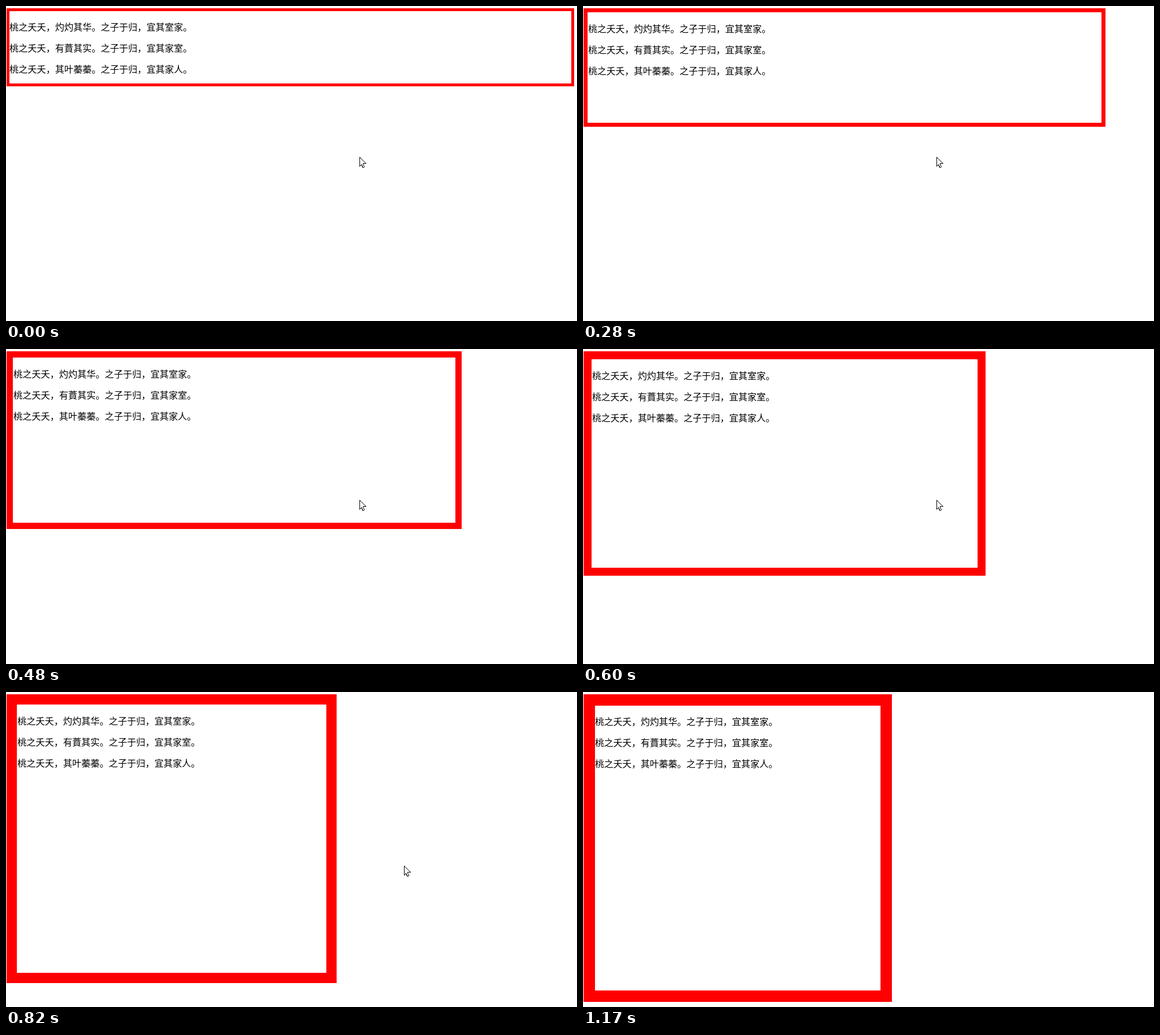
An HTML page that plays this animation: 1000x553 px, repeating every 1.5 s.

```html
<!DOCTYPE html>
<html lang="zh-CN">
<head>
<meta charset="utf-8">
<title>Growing border box</title>
<style>
  html, body { margin: 0; width: 100%; height: 100%; overflow: hidden; background: #fff; }
  svg { display: block; width: 1000px; height: 553px; }
  text { font: 350 16px "Noto Sans CJK SC", "Noto Sans CJK", "Noto Sans CJK JP", sans-serif; fill: #000; }
</style>
</head>
<body>
<svg viewBox="0 0 1000 553">
  <path id="frame" fill="#f00" fill-rule="evenodd" shape-rendering="crispEdges"/>
  <g id="poem">
    <text x="1" y="38">桃之夭夭，灼灼其华。之子于归，宜其室家。</text>
    <text x="1" y="75">桃之夭夭，有蕡其实。之子于归，宜其家室。</text>
    <text x="1" y="112">桃之夭夭，其叶蓁蓁。之子于归，宜其家人。</text>
  </g>
  <path id="cursor" d="M.5 .5V16.5L3.5 13.5 6 18.5H7.5L8.5 17.5 6.5 12.5V11.5H11.5Z"
    fill="#fff" stroke="#000" shape-rendering="crispEdges"/>
</svg>
<script>
const LOOP = 1500, CURSOR_GONE = 1170;
const LEFT = 1, TOP = 4;

// The picture refreshes every STEP ms, counted anew from each restart.
const STEP = 70, RESTARTS = [0, 480, 530, 820];

// [time, value, ...] keys, linear in between
const PROGRESS = [[0, 0], [280, .276], [480, .458], [740, .743], [1030, 1]];
const POINTER = [[728, 619, 265], [960, 815, 366], [1100, 907, 453]];

const [frame, poem, cursor] = ["frame", "poem", "cursor"].map(id => document.getElementById(id));
const lerp = (a, b, p) => a + (b - a) * p;
const clamp = p => Math.min(1, Math.max(0, p));
const swing = x => .5 - Math.cos(Math.PI * x) / 2;
const rect = (x, y, w, h) => `M${x} ${y}h${w}v${h}h${-w}z`;

function refreshTime(t) {
  const base = RESTARTS.filter(r => r <= t).pop();
  return base + Math.floor((t - base) / STEP) * STEP;
}

function sample(keys, t) {
  const found = keys.findIndex((key, i) => i > 0 && key[0] >= t);
  const next = found < 0 ? keys.length - 1 : found;
  const [t0, ...from] = keys[next - 1];
  const [t1, ...to] = keys[next];
  const p = clamp((t - t0) / (t1 - t0));
  return from.map((v, i) => lerp(v, to[i], p));
}

function draw(time) {
  const t = refreshTime(time);
  const p = swing(sample(PROGRESS, t)[0]);
  const width = Math.round(lerp(994, 540, p));
  const height = Math.round(lerp(137, 540, p));
  const border = lerp(5, 20, p);
  const edge = Math.floor(border);
  const shift = Math.round(border);

  frame.setAttribute("d", rect(LEFT, TOP, width, height) +
    rect(LEFT + edge, TOP + edge, width - 2 * edge, height - 2 * edge));
  poem.setAttribute("transform", `translate(${shift} ${shift})`);

  const [x, y] = sample(POINTER, t).map(Math.round);
  cursor.setAttribute("transform", `translate(${x} ${y})`);
  cursor.style.display = time < CURSOR_GONE ? "" : "none";
}

const start = performance.now();
function loop() {
  draw((performance.now() - start) % LOOP);
  requestAnimationFrame(loop);
}
loop();
</script>
</body>
</html>
```
